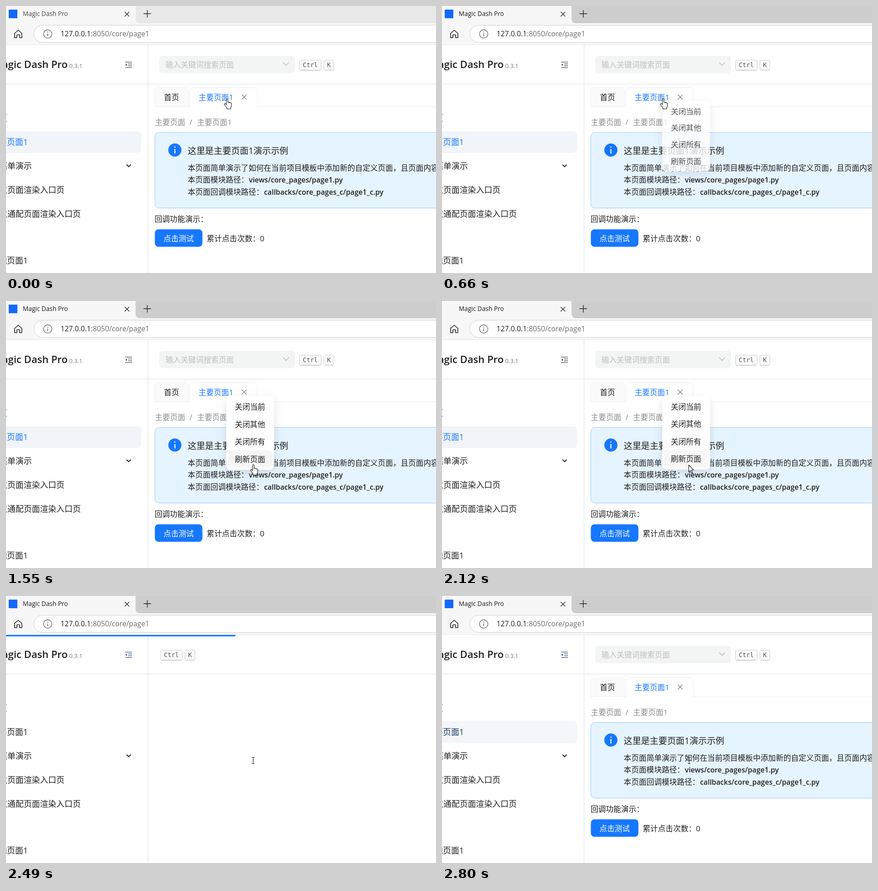
Recreate the animation shown at these times as an HTML page. Size 949 px wide and 590 px high, loop 2830 ms.

```html
<!DOCTYPE html>
<html lang="zh-CN">
<head>
<meta charset="utf-8">
<title>Magic Dash Pro</title>
<style>
html, body { margin: 0; width: 100%; height: 100%; overflow: hidden; background: #fff; }
svg { display: block; width: 949px; height: 590px; }
text { font: 16.8px 'Open Sans', 'Noto Sans CJK SC', 'Noto Sans CJK', sans-serif; fill: #1f1f1f; white-space: pre; }
.line { fill: none; stroke: #222; stroke-width: 1.4; }
.rule { fill: none; stroke: #dcdee4; }
.side text { font-size: 18px; }
.blue, .side .blue { fill: #1677ff; }
.muted { fill: #8c8c8c; }
.bold { font-weight: 600; font-size: 15.8px; }
.key rect { fill: #fafafa; stroke: #ccc; }
.key text { font: 13.7px 'DejaVu Sans Mono', monospace; fill: #555; }
#menu { filter: drop-shadow(0 6px 8px rgba(0,0,0,.07)) drop-shadow(0 9px 16px rgba(0,0,0,.06)); }
.cursor { fill: #fff; stroke: #111; stroke-width: 1.1; stroke-linejoin: round; }
</style>
</head>
<body>
<svg viewBox="0 0 949 590">
  <rect width="949" height="590" fill="#fff"/>

  <g id="page">
    <path class="rule" d="M313.5 86V590M0 172.5H949"/>
    <g class="side">
      <text x="136" y="137" text-anchor="end" style="font-size:22.2px;font-weight:600">Magic Dash Pro</text>
      <text x="139.5" y="137" style="font-size:13px;fill:#777">0.3.1</text>
      <g id="fold">
        <path d="M263 124H278M269.5 128H278M269.5 132H278M263 136H278" fill="none" stroke="currentColor" stroke-width="1.4"/>
        <path d="M263 130l4 -3v6z" fill="currentColor"/>
      </g>
      <text class="blue" x="3" y="254" text-anchor="end">首页</text>
      <rect id="activeRow" x="-20" y="277" width="318.5" height="48" rx="9" fill="#f1f4f9"/>
      <text id="activeText" x="48.2" y="307" text-anchor="end">主要页面1</text>
      <text x="57" y="360" text-anchor="end">多级菜单演示</text>
      <path class="line" style="stroke-width:2" d="M266 350.5l4.7 4.7l4.7 -4.7"/>
      <text x="129" y="413" text-anchor="end">独立页面渲染入口页</text>
      <text x="165" y="466" text-anchor="end">独立通配页面渲染入口页</text>
      <text x="48.2" y="569" text-anchor="end">其他页面1</text>
    </g>

    <g id="keys" class="key">
      <rect x="647.5" y="119.5" width="48" height="22" rx="3"/>
      <path d="M649 142H694M703 142H722" stroke="#bbb"/>
      <text x="655" y="135">Ctrl</text>
      <rect x="701.5" y="119.5" width="22" height="22" rx="3"/>
      <text x="708.4" y="135">K</text>
    </g>

    <g id="content">
      <rect x="338" y="110" width="300" height="38.5" rx="8" fill="#f3f4f4"/>
      <text x="352" y="136" style="fill:#bfbfbf">输入关键词搜索页面</text>
      <path class="line" style="stroke:#bbb" d="M612 125l6 6.5l6 -6.5"/>

      <path d="M328.5 222.5V188.5q0 -8 8 -8H395q8 0 8 8V222.5" fill="#fafafa" stroke="#f0f0f0"/>
      <path d="M328 222.5H405.5V188.5q0 -8 8 -8H546.5q8 0 8 8V222.5H949" fill="none" stroke="#ededed"/>
      <text x="348.5" y="208">首页</text>
      <text class="blue" x="425" y="208">主要页面1</text>
      <path class="line" style="stroke:#777;stroke-width:1.2" d="M520.5 196l10.5 10.5m0 -10.5l-10.5 10.5"/>

      <text class="muted" x="328.5" y="262.5">主要页面</text>
      <text class="muted" x="405" y="262.5">/</text>
      <text class="muted" x="421.5" y="262.5">主要页面1</text>

      <rect x="328.5" y="279.5" width="700" height="167" rx="9" fill="#e6f4ff" stroke="#91caff"/>
      <circle class="blue" cx="372.7" cy="318.3" r="14.5"/>
      <path d="M372.7 316V326M372.7 310.5v2.5" stroke="#fff" stroke-width="2.2"/>
      <text x="401" y="327" style="font-size:19.2px">这里是主要页面1演示示例</text>
      <text x="401" y="363.5">本页面简单演示了如何在当前项目模板中添加新的自定义页面，且页面内容均为</text>
      <text x="401" y="390">本页面模块路径：</text>
      <text class="bold" x="536" y="389.5">views/core_pages/page1.py</text>
      <text x="401" y="417">本页面回调模块路径：</text>
      <text class="bold" x="569.5" y="416.5">callbacks/core_pages_c/page1_c.py</text>

      <text x="328" y="477">回调功能演示：</text>
      <rect class="blue" x="328.5" y="493.5" width="105" height="38.5" rx="8"/>
      <text x="381" y="519.5" text-anchor="middle" style="fill:#fff">点击测试</text>
      <text x="443" y="520">累计点击次数：0</text>
    </g>
  </g>

  <rect id="bar" y="86" height="3" fill="#1677ff" style="filter:drop-shadow(0 0 3px #1677ff88)"/>

  <rect width="949" height="86" fill="#f7f7f7"/>
  <path id="strip" d="M286 0H949V38H296Q286 38 286 28Z"/>
  <path d="M0 85.5H949" stroke="#e6e6e6"/>
  <rect id="favicon" x="6" y="8" width="19" height="19" fill="#1268fb"/>
  <text id="tabTitle" x="37" y="22" style="font-size:13.8px">Magic Dash Pro</text>
  <path class="line" d="M262 13l10 10m0 -10l-10 10M303.5 17H320M311.8 9V25.5"/>
  <path class="line" style="stroke-width:1.6" stroke-linejoin="round" d="M19 60.5l8 -7l8 7V70H30V64.5q0 -1 -1 -1H25q-1 0 -1 1V70H19Z"/>
  <rect x="61.5" y="42.5" width="920" height="38" rx="19" fill="#fff" stroke="#cfcfcf"/>
  <circle class="line" style="stroke:#666;stroke-width:1.3" cx="92" cy="61.7" r="9.2"/>
  <path d="M92 60.5V66.5M92 56.8v1.7" stroke="#666" stroke-width="1.5"/>
  <text x="120.5" y="67.3" style="font-size:15.8px">127.0.0.1<tspan fill="#6b6b6b">:8050/core/page1</tspan></text>

  <g id="menu">
    <rect x="486" y="209" width="105.5" height="164" rx="9" fill="#fff"/>
    <g id="rows"></g>
  </g>

  <path id="hand" class="cursor" d="M-1.7 1.5a1.7 1.7 0 0 1 3.4 0V8q1.5 -1.2 2.8 .4q1.8 -.9 2.7 .8q2.4 -.6 2.4 1.8V15q0 3 -1.8 4.5V22.5H-.5V20L-5.6 13.5q-1.2 -2 .4 -2.8q1.3 -.3 2.2 .8l1.3 1.5Z"/>
  <path id="arrow" class="cursor" d="M544.5 362.5V378l3.7 -3.4l2.6 5.8l2.4 -1l-2.6 -5.7h4.7Z"/>
  <path id="beam" class="line" style="stroke-width:1.2" d="M542.5 356.5h2.2l.8 .7l.8 -.7h2.2M545.5 357V370M542.5 370.5h2.2l.8 -.7l.8 .7h2.2"/>
</svg>
<script>
const LOOP = 2830;
// Moments of the story, in ms.
const FOCUS = 450, OPEN = 610, MOVE = 1050, ARRIVE = 1550, CLICK = 1940;
const RELOAD = 2030, BLANK = 2150, SHELL = 2430, READY = 2640;

const $ = id => document.getElementById(id);
const ramp = (t, from, to) => Math.min(1, Math.max(0, (t - from) / (to - from)));
const mix = (a, b, p) => a + (b - a) * p;
const blend = (a, b, p) => `rgb(${a.map((v, i) => mix(v, b[i], p))})`;
const show = (id, on) => $(id).style.display = on ? '' : 'none';
const set = (id, name, value) => $(id).setAttribute(name, value);

const labels = ['关闭当前', '关闭其他', '关闭所有', '刷新页面'];
$('rows').innerHTML = labels.map((label, i) => {
  const y = 214 + i * 38.5;
  return `<rect x="490" y="${y}" width="97" height="38.5" rx="5" fill="#f5f5f5"/>
    <text x="505" y="${y + 26}">${label}</text>`;
}).join('');
const highlights = $('rows').querySelectorAll('rect');
// When the pointer enters each menu row, and when it leaves the last.
const entries = [1090, 1215, 1290, 1380, CLICK + 30];

function drawBrowser(t) {
  const focus = ramp(t, FOCUS - 40, FOCUS + 120) * (t >= FOCUS);
  set('strip', 'fill', blend([232, 232, 232], [205, 205, 205], focus));
  $('tabTitle').style.fill = blend([72, 72, 72], [26, 26, 26], focus);
  show('favicon', t < RELOAD || t >= SHELL);
}

function drawPage(t) {
  const reloaded = t >= SHELL;
  const ready = t < BLANK || t >= READY;
  show('page', t < BLANK || reloaded);
  show('content', ready);
  set('keys', 'transform', `translate(${ready ? 0 : -306.5} 0)`);

  set('activeRow', 'opacity', reloaded ? ramp(t, READY, READY + 200) : 1);
  const blue = reloaded ? ramp(t, READY + 120, READY + 280) : 1;
  $('activeText').style.fill = blend([31, 31, 31], [22, 119, 255], blue);
  $('fold').style.color = reloaded ? '#536b94' : '#666';

  show('bar', reloaded);
  set('bar', 'width', Math.max(0, (t - SHELL) * 8.3));
  set('bar', 'opacity', 1 - ramp(t, READY, READY + 120));
}

function drawMenu(t) {
  const open = 1 - (1 - ramp(t, OPEN, OPEN + 200)) ** 5;
  // Reloading freezes the page just as the menu starts to close.
  const frozen = Math.min(t, RELOAD);
  const shown = open * (1 - ramp(frozen, CLICK, CLICK + 200) ** 5);
  show('menu', shown > 0 && t < BLANK);
  set('menu', 'opacity', shown);
  set('menu', 'transform', `translate(0 209) scale(1 ${mix(.8, 1, shown)}) translate(0 -209)`);
  highlights.forEach((row, i) => {
    const [enter, leave] = entries.slice(i);
    row.setAttribute('opacity', ramp(frozen, enter, enter + 70) * (1 - ramp(frozen, leave, leave + 180)));
  });
}

function drawCursor(t) {
  const rest = 1 - ramp(t, MOVE, ARRIVE) ** 1.5;
  const x = mix(546, 488, rest ** 4);
  const y = mix(362, 205, rest ** 2.6);
  set('hand', 'transform', `translate(${x} ${y})`);
  show('hand', t < CLICK);
  show('arrow', t >= CLICK && t < SHELL);
  show('beam', t >= SHELL);
}

const start = performance.now();
function tick() {
  const t = (performance.now() - start) % LOOP;
  drawBrowser(t);
  drawPage(t);
  drawMenu(t);
  drawCursor(t);
  requestAnimationFrame(tick);
}
tick();
</script>
</body>
</html>
```
